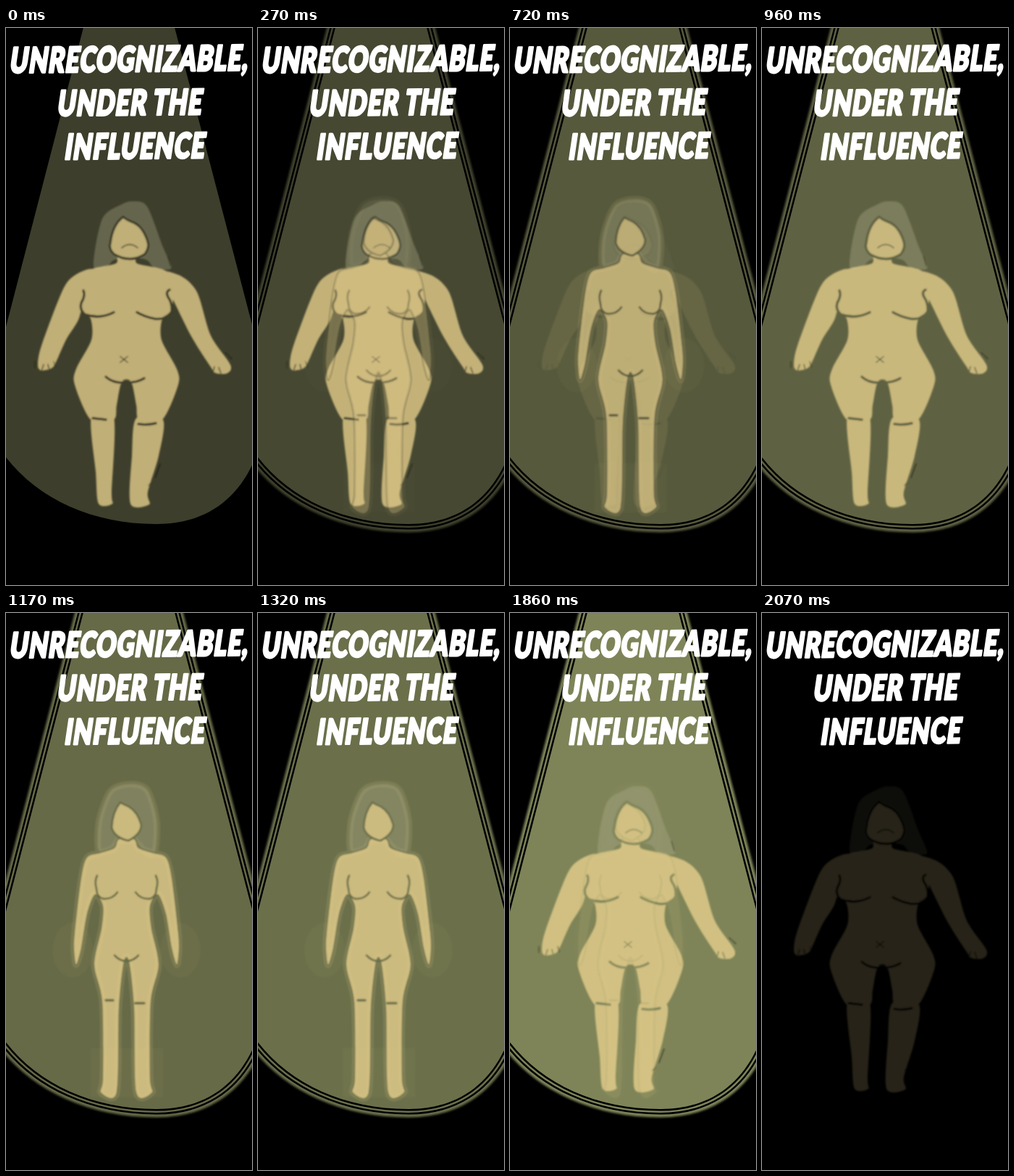
Recreate the animation shown at these times as an HTML page. Size 340 by 768 pixels, loop 2500 ms.

```html
<!DOCTYPE html>
<html lang="en">
<head>
<meta charset="utf-8">
<title>Unrecognizable</title>
<style>
  html, body { margin: 0; width: 100%; height: 100%; overflow: hidden; background: #000; }
  svg { display: block; width: 340px; height: 768px; }
  .light { fill: var(--light); }
  .line, .thin, .fine { fill: none; stroke: var(--light); stroke-width: 3.6; stroke-linecap: round; stroke-linejoin: round; }
  .thin { stroke-width: 2.8; }
  .fine { stroke-width: 1.6; }
  .skin { fill: #ecd590; opacity: .75; }
  .hair { fill: #b2ae8e; opacity: .35; }
  .halo { fill: none; stroke: #ecd590; stroke-width: 9; stroke-linejoin: round; opacity: .13; }
  .mark { fill: none; stroke: #14140a; stroke-width: 1.4; stroke-linecap: round; opacity: .5; }
  .smudge { fill: #ecd590; opacity: .035; }
  text { font: 900 48px Lato, "Open Sans", sans-serif; letter-spacing: 1.6px; text-anchor: middle;
    fill: #fff; stroke: #fff; stroke-width: 3; stroke-linejoin: round; }
</style>
</head>
<body>
<svg viewBox="0 0 340 768">
  <defs>
    <path id="cone" d="M112 -20L-26 512Q-22 562 0 592C45 650 120 684 208 684C270 684 315 655 340 603Q362 560 366 508L228 -20Z"/>
    <filter id="soft" x="-20%" y="-20%" width="140%" height="140%"><feGaussianBlur stdDeviation="1.6"/></filter>
    <filter id="edge"><feGaussianBlur stdDeviation=".8"/></filter>
  </defs>
  <g id="rays" fill="none"></g>
  <use href="#cone" class="light"/>
  <g id="wide" filter="url(#edge)"></g>
  <g id="slim" filter="url(#edge)"></g>
  <g id="title"></g>
</svg>
<script>
const LOOP = 2500, STEP = 30, AXIS = 166.5;
const $ = id => document.getElementById(id);
const points = list => list.trim().split(/\s+/).map(s => s.split(',').map(Number));

// Smooth closed curve through a few points
function curve(p) {
  const at = i => p[(i + p.length) % p.length];
  return 'M' + p[0] + p.map((b, i) => {
    const a = at(i - 1), c = at(i + 1), e = at(i + 2);
    const c1 = b.map((v, k) => v + (c[k] - a[k]) / 7);
    const c2 = c.map((v, k) => v - (e[k] - b[k]) / 7);
    return `C${c1} ${c2} ${c}`;
  }).join('') + 'Z';
}
const shape = list => curve(points(list));
// A left half completed by its reflection
function mirrored(list) {
  const half = points(list);
  return curve([...half, ...half.map(([x, y]) => [2 * AXIS - x, y]).reverse()]);
}
const draw = (cls, ...paths) => `<g class="${cls}">${paths.map(d => `<path d="${d}"/>`).join('')}</g>`;
const both = svg => svg + `<g transform="matrix(-1 0 0 1 ${2 * AXIS} 0)">${svg}</g>`;

const wideFace = 'M162 260Q147 271 144 296Q141 304 149 312Q172 325 192 312Q199 303 196 294Q189 272 174 267Q166 264 162 260Z';
const wideHair = shape('121,328 133,263 160,243 175,239 195,246 217,302 228,327 225,333 205,331 192,319 152,319 140,328');
const wideBody = [
  mirrored('155,314 151,325 112,335 102,362 105,390 117,401 118,430 97,470 95,492 117,540 149,540 153,520 160,488'),
  shape('118,536 124,612 128,656 147,656 146,640 149,536'),
  shape('217,540 211,590 196,640 198,657 172,656 174,590 180,538'),
  shape('118,333 95,341 78,362 49,438 44,464 48,472 61,470 68,463 83,430 101,400 108,364'),
  shape('208,335 240,341 264,364 283,424 310,464 306,476 290,476 282,466 256,425 226,365')
];
$('wide').innerHTML =
  draw('hair', wideHair) +
  draw('skin', ...wideBody) +
  draw('light', wideFace) + draw('skin', wideFace) +
  draw('line', wideFace,
    'M107 362Q110 369 104 379Q101 388 109 395Q130 402 149 392',
    'M226 361Q220 364 224 371Q230 379 229 391Q221 403 206 401Q191 398 181 392',
    'M138 481Q147 489 160 489Q180 490 191 483',
    'M120 538L138 540', 'M183 546Q194 548 207 545') +
  draw('fine', 'M160 303Q171 294 182 303', 'M158 453l10 8m0-8l-10 8',
    'M49 473l3-9m8 8l-2-8', 'M286 475l2-8m9 9l-3-8') +
  draw('mark', 'M40 460v8m26-8l2 7', 'M303 448l9 8', 'M213 601l-7 19m-5 6l-4 5', 'M223 315l4 13');

const slimFace = 'M158 261Q147 274 146 296Q150 310 169 314Q187 305 187 292Q182 274 170 267Q163 264 158 261Z';
const slimHair = shape('128,327 129,285 145,245 172,236 195,244 208,285 206,329 194,331 178,315 156,315 146,326');
const slimBody = mirrored(`156,312 150,324 130,331 112,337 104,365 95,440 94,465 97,485 104,462 112,415
  123,388 134,404 132,435 122,485 133,536 134,640 131,661 153,661 156,545 163,481`);
$('slim').innerHTML =
  '<rect class="smudge" x="117" y="600" width="100" height="68"/>' +
  both('<ellipse class="smudge" cx="92" cy="465" rx="28" ry="38"/>') +
  draw('halo', slimHair, slimBody) +
  draw('hair', slimHair) +
  draw('line', slimBody) + draw('skin', slimBody) +
  draw('light', slimFace) + draw('skin', slimFace) + draw('thin', slimFace) +
  both(draw('thin', 'M126 362Q122 370 125 380Q125 391 134 394Q147 395 154 385', 'M150 472Q157 480 167 480')) +
  draw('line', 'M138 534h10', 'M179 538h12');

const ring = (color, width, extra = '') =>
  `<use href="#cone" stroke="${color}" stroke-width="${width}" ${extra}/>`;
$('rays').innerHTML = ring('var(--light)', 23, 'filter="url(#soft)"') +
  ring('#000', 15) + ring('var(--light)', 10) + ring('#000', 5);

const title = [['UNRECOGNIZABLE,', 169], ['UNDER THE', 170], ['INFLUENCE', 177]];
$('title').innerHTML = title.map(([words, x], i) =>
  `<text transform="translate(${x} ${60 * (i + 1)}) rotate(-.6) skewX(-9) scale(.7 1)">${words}</text>`).join('');

const ramp = (t, from, to) => Math.max(0, Math.min(1, (t - from) / (to - from)));
const dark = [61, 62, 43], bright = [126, 132, 88];

function render(t) {
  const r = (from, to) => ramp(t, from, to);
  const off = r(1890, 2070);
  const light = dark.map((v, i) => Math.round((v + (bright[i] - v) * r(0, 1860)) * (1 - off)));
  const opacity = {
    wide: 1 - r(450, 570) + r(690, 900) - r(1050, 1170) + r(1680, 1830) - .78 * off,
    slim: r(90, 540) - r(690, 930) + r(1050, 1170) - r(1680, 1890),
    rays: r(30, 300) - r(1440, 1530) + r(1680, 1830) - off
  };
  document.documentElement.style.setProperty('--light', `rgb(${light})`);
  for (const id in opacity) $(id).setAttribute('opacity', opacity[id]);
}

const start = performance.now();
function tick() {
  const t = (performance.now() - start) % LOOP;
  render(Math.floor(t / STEP) * STEP);
  requestAnimationFrame(tick);
}
tick();
</script>
</body>
</html>
```
